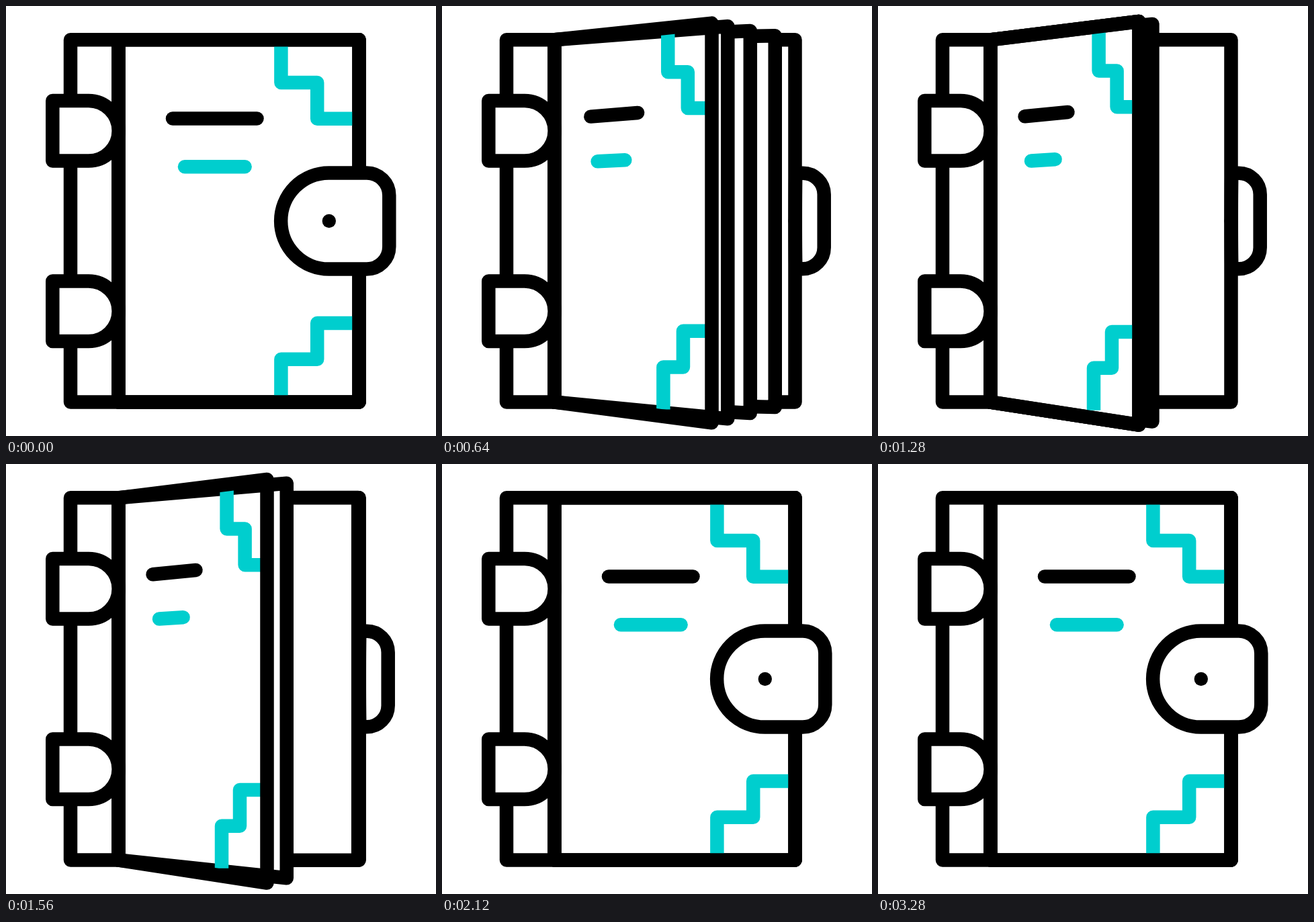
An HTML page with a canvas for the animation above (4000 ms loop, 640 by 640 pixels).

```html
<!DOCTYPE html>
<html lang="en">
<head>
<meta charset="utf-8">
<title>Notebook</title>
<style>
  html, body { margin: 0; height: 100%; overflow: hidden; background: #fff; }
  canvas { display: block; width: 640px; height: 640px; }
</style>
</head>
<body>
<canvas id="stage" width="640" height="640"></canvas>
<script>
const ctx = document.getElementById('stage').getContext('2d');
const INK = '#000', TEAL = '#00cece';
const LOOP = 4000, STEP = 40;
const SPINE = 167.5, EDGE = 525.5, TOP = 50.3, BOTTOM = 589.5;
const PAGES = 3;

const lerp = (a, b, k) => a + (b - a) * k;
const smooth = u => u * u * (3 - 2 * u);
const quad = u => u < .5 ? 2 * u * u : 1 - 2 * (1 - u) ** 2;
const ramp = (t, from, length, ease = smooth) =>
  ease(Math.min(1, Math.max(0, (t - from) / length)));

// Sheet 0 is the cover: it opens first and closes last.
const openness = (t, i) =>
  ramp(t, 122 + 119 * i, 640 - 35 * i) - ramp(t, 1632 - 134 * i, 208);

const edgeX = k => lerp(EDGE, 388.5, k);

function draw(d, color = INK, fill = false) {
  const path = new Path2D(d);
  if (fill) {
    ctx.fillStyle = '#fff';
    ctx.fill(path);
  }
  ctx.strokeStyle = color;
  ctx.stroke(path);
}

function sheet(k, fill) {
  const top = lerp(TOP, 23, k), bottom = lerp(BOTTOM, 623.5, k);
  draw(`M${SPINE} ${TOP}L${edgeX(k)} ${top}V${bottom}L${SPINE} ${BOTTOM}Z`, INK, fill);
}

function bar(x, y, width, rise, color) {
  ctx.lineCap = 'round';
  draw(`M${x} ${y}l${width} ${-rise}`, color);
}

// Corner staircase; dir is 1 at the top of the cover and -1 at the bottom
function stairs(x, y, k, dir) {
  ctx.lineCap = 'butt';
  draw(`M${x} ${y - 63 * dir}V${y}h${lerp(53.8, 27, k)}v${53.7 * dir}H${edgeX(k)}`, TEAL);
}

function decorate(k) {
  bar(lerp(248, 218.5, k), lerp(167.6, 164.3, k), lerp(125.5, 64, k), 6.3 * k, INK);
  bar(lerp(266, 228, k), lerp(239.3, 230.5, k), lerp(89.6, 35.6, k), 2.2 * k, TEAL);
  stairs(lerp(409.4, 328.6, k), lerp(114, 96.6, k), k, 1);
  stairs(lerp(409.4, 321, k), lerp(525.7, 538.8, k), k, -1);
}

function ring(y) {
  draw(`M122.9 ${y}H69.3v89.5H122.9a44.7 44.7 0 0 0 0-89.5Z`, INK, true);
}

function clasp(fold, dotY) {
  const half = lerp(71.6, 71.2, fold), top = 320 - half;
  const x = lerp(480.5, 526.6, fold), rx = lerp(71.4, .8, fold);
  const r = lerp(33.3, 31.7, fold);
  draw(`M537 ${top}H${x}a${rx} ${half} 0 0 0 0 ${2 * half}H537` +
       `a${r} ${r} 0 0 0 ${r} ${-r}V${top + r}a${r} ${r} 0 0 0 ${-r} ${-r}Z`, INK, true);
  ctx.fillStyle = INK;
  ctx.beginPath();
  ctx.arc(lerp(480.8, EDGE, fold), dotY, 10.2, 0, 7);
  ctx.fill();
}

function render(t) {
  ctx.fillStyle = '#fff';
  ctx.fillRect(0, 0, 640, 640);
  ctx.lineWidth = 20.5;
  ctx.lineJoin = 'round';

  draw(`M96 ${TOP}H${EDGE}V${BOTTOM}H96Z`);
  for (let i = PAGES; i > 0; i--) sheet(openness(t, i), true);
  const k = openness(t, 0);
  decorate(k);
  sheet(k, false);
  ring(141);
  ring(409.5);

  const fold = ramp(t, 40, 200) - ramp(t, 1920, 200);
  const swing = from => ramp(t, from, 280, quad);
  const bounce = -15 * swing(2440) + 30.6 * swing(2720) - 15.6 * swing(3000);
  clasp(fold, 320 + bounce);
}

const start = performance.now();
function tick() {
  const t = (performance.now() - start) % LOOP;
  render(Math.floor(t / STEP) * STEP);
  requestAnimationFrame(tick);
}
tick();
</script>
</body>
</html>
```
